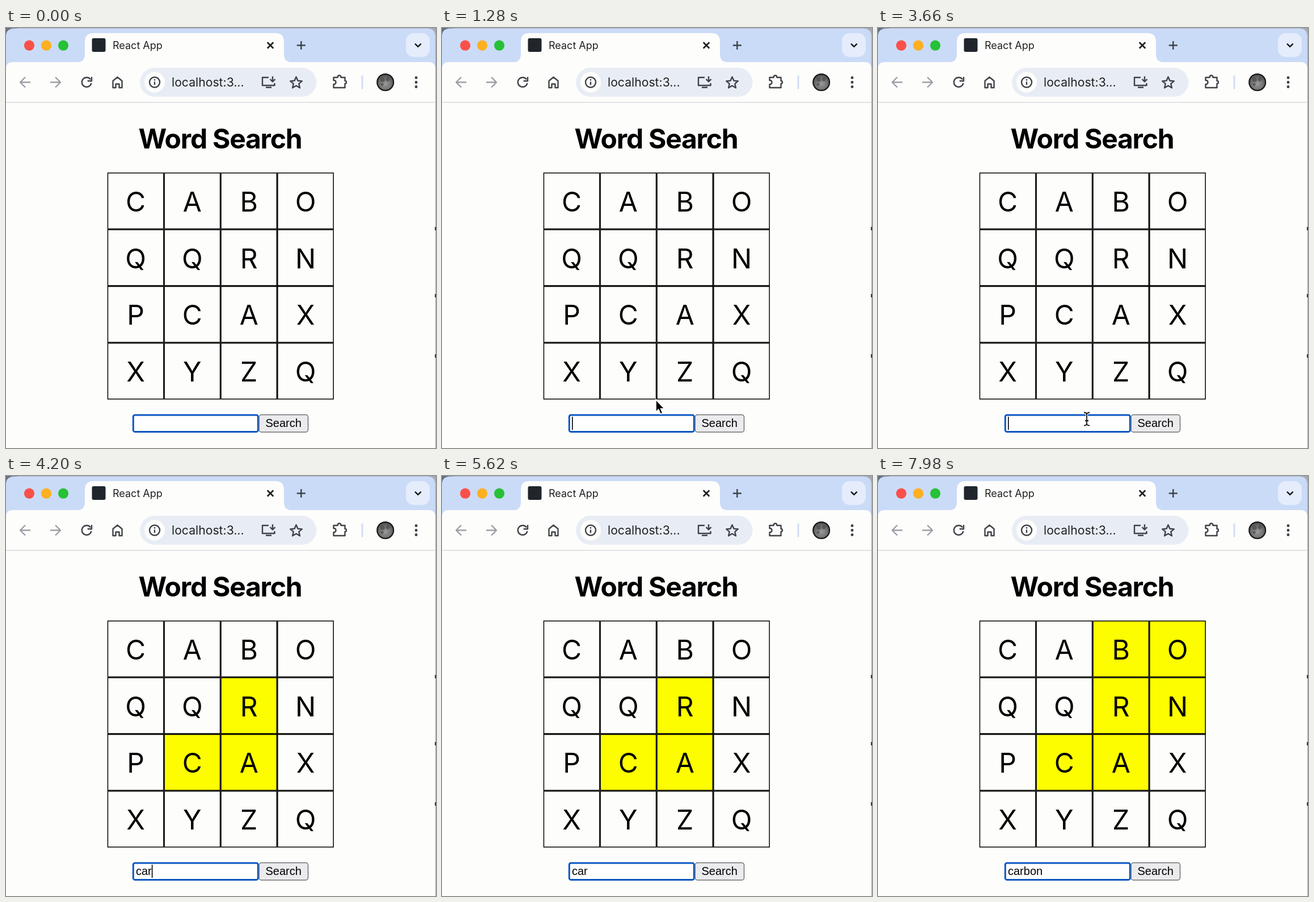
These frames come from a looping animation (758 px wide and 739 px high, 8000 ms). An HTML page:

```html
<!DOCTYPE html>
<html lang="en">
<head>
<meta charset="utf-8">
<title>Word Search</title>
<style>
  html, body { margin: 0; width: 100%; height: 100%; overflow: hidden; background: #9aa1ab; }
  svg { display: block; width: 100vw; height: 100vh; }
  text { font-family: Inter, Roboto, sans-serif; fill: #000; white-space: pre; }
  .chrome { fill: #1f2023; }
  .control { font: 20px "Liberation Sans", Arial, sans-serif; }
  .icon { fill: none; stroke: #3f4247; stroke-width: 2.4; stroke-linejoin: round; }
  .dim { stroke: #9b9ea3; }
  .strong { stroke: #1f2023; stroke-width: 2.7; }
  .cell { fill: transparent; stroke: #000; stroke-width: 1.5; }

  .first, .second, .type, .caret, .arrow, .beam { animation: 8s step-end infinite; }
  .first { animation-name: first; }
  .second { animation-name: second; }
  .type { animation-name: type; }
  .caret { animation-name: blink; }
  .arrow { animation-name: arrow; }
  .beam { animation-name: beam; }
  .glide { animation: glide 8s linear infinite; }

  @keyframes first { 0% { fill: transparent } 51.5%, 100% { fill: #fdfd00 } }
  @keyframes second { 0% { fill: transparent } 80.25%, 100% { fill: #fdfd00 } }
  @keyframes type {
    0% { transform: translateX(0) }
    46.75% { transform: translateX(10px) }
    48% { transform: translateX(21.1px) }
    49.25% { transform: translateX(27.8px) }
    73.75% { transform: translateX(38.9px) }
    76% { transform: translateX(50px) }
    77.75%, 100% { transform: translateX(61.2px) }
  }
  @keyframes blink {
    0%, 9%, 21.5%, 34%, 55.5%, 68%, 84%, 96.5%, 100% { opacity: 0 }
    2.75%, 15.25%, 27.75%, 40.25%, 61.75%, 73.75%, 90.25% { opacity: 1 }
  }
  @keyframes arrow { 0%, 20%, 100% { opacity: 0 } 14.5% { opacity: 1 } }
  @keyframes beam { 0%, 46.75%, 100% { opacity: 0 } 20% { opacity: 1 } }
  @keyframes glide {
    0%, 14.5% { transform: translate(379px, 647px) }
    15.6%, 16.8% { transform: translate(377px, 654px) }
    20% { transform: translate(370px, 680px) }
    22%, 100% { transform: translate(368px, 688px) }
  }
</style>
</head>
<body>
<svg viewBox="0 0 758 739">
  <defs>
    <radialGradient id="moon" cx=".5" cy=".6" r=".6">
      <stop offset="0" stop-color="#9a9a9a"/>
      <stop offset=".6" stop-color="#747474"/>
      <stop offset="1" stop-color="#474747"/>
    </radialGradient>
    <path id="ibeam" d="M-5-11.5Q0-11.5 0-8V8Q0 11.5-5 11.5M5-11.5Q0-11.5 0-8M5 11.5Q0 11.5 0 8M-3 3H3"/>
  </defs>

  <!-- window -->
  <rect width="758" height="739" fill="#a4aab3"/>
  <path d="M0 0H20V20H0Z" fill="#66707f"/>
  <path d="M0 739V15Q0 .8 15 .8H742Q756.8 .8 756.8 15V739Z" fill="#cadbf8"/>
  <path d="M0 739V72Q0 60 12 60H745Q756.8 60 756.8 72V739Z" fill="#fdfdfb"/>
  <path d="M756 353h2M756 471h2M756 577h2" stroke="#333" stroke-width="6"/>
  <path d="M0 130.7H757" stroke="#d6d9de" stroke-width="1.5"/>

  <!-- tab strip -->
  <circle cx="41" cy="30.7" r="9.1" fill="#fb5049"/>
  <circle cx="71" cy="30.7" r="9.1" fill="#fdb022"/>
  <circle cx="101" cy="30.7" r="9.1" fill="#27c037"/>
  <path d="M124 60.5Q139 60.5 139 46V24Q139 9 154 9H475Q490 9 490 24V46Q490 60.5 505 60.5Z" fill="#fdfdfb"/>
  <rect x="151.5" y="18" width="24" height="24" rx="3" fill="#20252c"/>
  <text class="chrome" x="188" y="36.7" font-size="18">React App</text>
  <g class="icon">
    <path class="strong" d="M460.7 25.2l10.6 10.6m0-10.6l-10.6 10.6"/>
    <path d="M520.3 23v15m-7.5-7.5h15"/>
  </g>
  <rect x="705" y="9" width="42" height="42" rx="14" fill="#e5edfc"/>
  <path class="icon strong" d="M721 27.6l5.3 5.3 5.3-5.3"/>

  <!-- toolbar -->
  <rect x="236" y="70" width="311.5" height="51" rx="25.5" fill="#e8edf5"/>
  <circle cx="262" cy="95.5" r="18" fill="#fdfdfb"/>
  <text class="chrome" x="292" y="102.8" font-size="21.2">localhost:3...</text>
  <g class="icon">
    <path class="dim" d="M43 95.5H25m9-9l-9 9 9 9"/>
    <path class="dim" d="M78 95.5H96m-9-9l9 9-9 9"/>
    <path d="M149 90.5A8.4 8.4 0 1 0 150.4 97M151 86v7.3h-7.3"/>
    <path d="M188.5 93L196.5 86.5 204.5 93V105H199.5V98.5H193.5V105H188.5Z"/>
    <circle cx="262" cy="95.5" r="9"/>
    <path d="M262 94.5v5.5M262 90v2.5"/>
    <path d="M463 87H452V101H473.5V97M458 104.5H468M470 85v9m-4.5-4l4.5 4.5 4.5-4.5"/>
    <path d="M511.5 86l3 6.7 7.3.7-5.5 4.8 1.6 7.1-6.4-3.8-6.4 3.8 1.6-7.1-5.5-4.8 7.3-.7Z"/>
    <path d="M577.5 87H584.5Q584.5 83.5 587.5 83.5T590.5 87H597.5V93Q600 93 600 95.5T597.5 98V105H577.5V99Q581.5 99 581.5 95.5T577.5 92Z"/>
  </g>
  <path d="M628 83.5V107.5" stroke="#d0def8" stroke-width="3"/>
  <circle cx="668.7" cy="95.5" r="15.5" fill="#111"/>
  <circle cx="668.7" cy="95.5" r="13.5" fill="url(#moon)"/>
  <g fill="#4b4b4b" opacity=".7">
    <circle cx="664" cy="91" r="4"/>
    <circle cx="673" cy="90" r="3.5"/>
    <circle cx="663" cy="99" r="2.5"/>
  </g>
  <g fill="#3d4045">
    <circle cx="723" cy="87.5" r="2.4"/>
    <circle cx="723" cy="95.5" r="2.4"/>
    <circle cx="723" cy="103.5" r="2.4"/>
  </g>

  <!-- page -->
  <text x="377.4" y="211.5" font-size="48" font-weight="700" letter-spacing="-1.25" text-anchor="middle">Word Search</text>
  <g id="board" font-size="48" text-anchor="middle"></g>

  <rect x="224.3" y="681" width="220" height="29.4" rx="3" fill="#fff" stroke="#0b57c4" stroke-width="3"/>
  <text class="control" x="229" y="702">carbon</text>
  <g class="type">
    <rect x="229" y="684" width="70" height="23" fill="#fff"/>
    <rect class="caret" x="229" y="684" width="1.6" height="23"/>
  </g>
  <rect x="446.2" y="680.5" width="86.3" height="30.5" rx="4" fill="#ebebed" stroke="#727274" stroke-width="1.5"/>
  <text class="control" x="457.5" y="702">Search</text>

  <!-- pointer -->
  <g class="glide">
    <path class="arrow" d="M0 0V21.5L4.8 17.2 8.2 25.2 12 23.6 8.6 15.8H15Z" stroke="#fff" stroke-width="1.6"/>
    <g class="beam" fill="none">
      <use href="#ibeam" stroke="#fff" stroke-width="4"/>
      <use href="#ibeam" stroke="#111" stroke-width="1.8"/>
    </g>
  </g>
</svg>
<script>
  const SIZE = 99.8, LEFT = 178.7, TOP = 254.4;
  const groups = { first: [6, 9, 10], second: [2, 3, 7] };
  const groupOf = i => Object.keys(groups).find(name => groups[name].includes(i)) || '';

  document.getElementById('board').innerHTML = [...'CABOQQRNPCAXXYZQ'].map((letter, i) => {
    const x = LEFT + i % 4 * SIZE, y = TOP + Math.floor(i / 4) * SIZE;
    return `<rect class="cell ${groupOf(i)}" x="${x + .75}" y="${y + .75}" width="${SIZE - 1.5}" height="${SIZE - 1.5}"/>
      <text x="${x + SIZE / 2}" y="${y + 68.3}">${letter}</text>`;
  }).join('');
</script>
</body>
</html>
```
